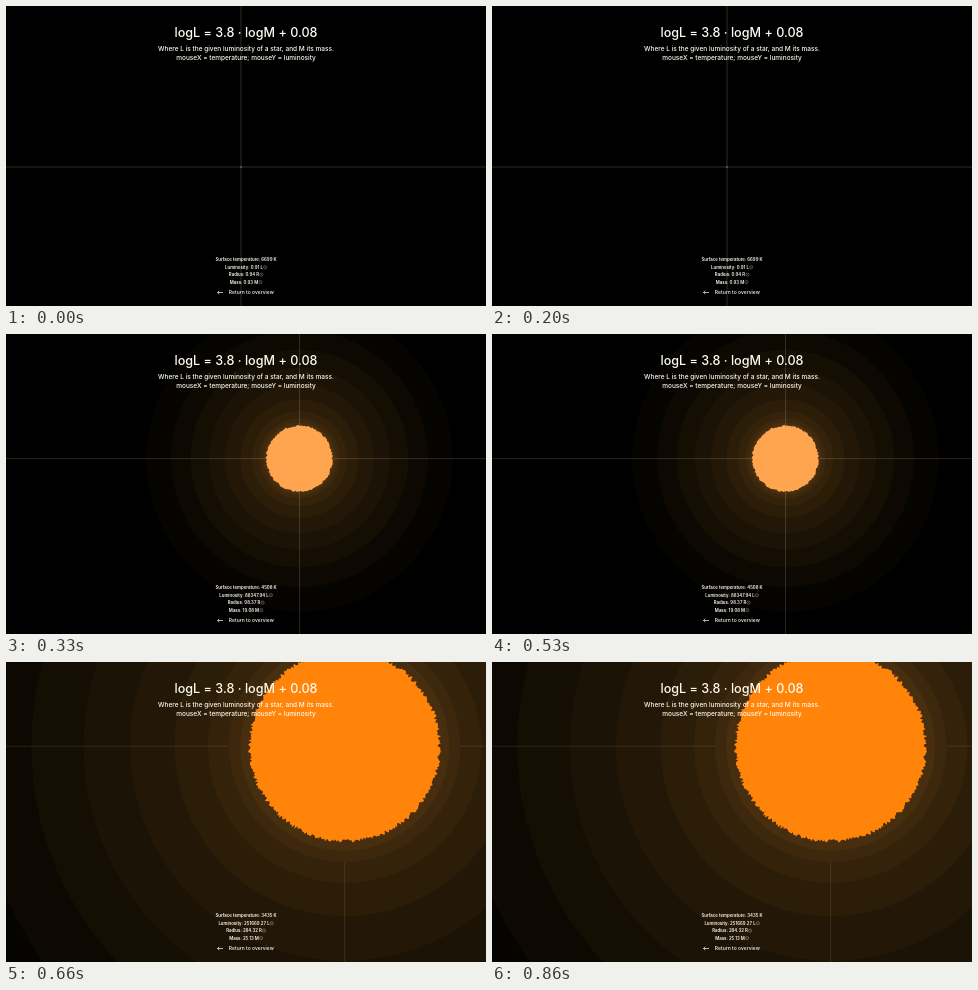
Write an HTML page with a canvas that moves like this. It is 480x300 px and loops after 0.99 s.

```html
<!DOCTYPE html>
<html lang="en">
<head>
<meta charset="utf-8">
<title>Mass and luminosity</title>
<style>
html, body { margin: 0; width: 100%; height: 100%; overflow: hidden; background: #000; }
canvas { display: block; }
</style>
</head>
<body>
<canvas id="stage" width="480" height="300"></canvas>
<script>
const ctx = document.getElementById('stage').getContext('2d');
const STEP = 330;
const SANS = 'Inter, Lato, sans-serif';
const RINGS = [4.65, 3.9, 3.3, 2.75, 2.26, 1.79, 1.44, 1.22, 1.1];

const states = [
  { x: 235, y: 161, r: 0.7, color: '#8d8b88', glow: 0, spikes: 0, line: 0.19, gap: 0,
    temp: '6699', lum: '0.91', radius: '0.94', mass: '0.93' },
  { x: 293.5, y: 124.6, r: 33, color: '#ffa54f', glow: 0.023, spikes: 0.9, line: 0.15, gap: 0,
    temp: '4508', lum: '88347.94', radius: '98.37', mass: '19.08' },
  { x: 338.7, y: 84.2, r: 95, color: '#ff8409', glow: 0.023, spikes: 2, line: 0.1, gap: 116,
    temp: '3435', lum: '251669.27', radius: '284.32', mass: '25.13' }
];

function random(seed) {
  return () => {
    seed = (seed * 16807) % 2147483647;
    return seed / 2147483647;
  };
}

function disc(x, y, r) {
  ctx.beginPath();
  ctx.arc(x, y, r, 0, Math.PI * 2);
  ctx.fill();
}

// Stacked translucent discs, a little stronger towards the star
function drawGlow(s) {
  if (!s.glow) return;
  RINGS.forEach((k, i) => {
    ctx.fillStyle = `rgba(255, 160, 60, ${s.glow * (1 + 0.13 * i)})`;
    disc(s.x, s.y, s.r * k);
  });
}

function drawCross(s) {
  const x = s.x, y = s.y, g = s.gap;
  ctx.fillStyle = `rgba(255, 240, 220, ${s.line})`;
  ctx.fillRect(0, y - 0.5, x - g, 1);
  ctx.fillRect(x + g, y - 0.5, 480 - x - g, 1);
  ctx.fillRect(x - 0.5, 0, 1, Math.max(0, y - g));
  ctx.fillRect(x - 0.5, y + g, 1, 300 - y - g);
}

function drawStar(s) {
  ctx.fillStyle = s.color;
  if (!s.spikes) return disc(s.x, s.y, s.r);
  const rnd = random(4711);
  const n = Math.round(s.r * 4.4);
  ctx.beginPath();
  for (let i = 0; i < n; i++) {
    const a = i / n * Math.PI * 2;
    const r = s.r + s.spikes * (rnd() * 2 - 1);
    ctx.lineTo(s.x + r * Math.cos(a), s.y + r * Math.sin(a));
  }
  ctx.closePath();
  ctx.fill();
}

function text(str, y, size, weight = 500, x = 240) {
  ctx.font = `${weight} ${size}px ${SANS}`;
  ctx.fillText(str, x, y);
}

// A reading in solar units: label, value, unit letter and a dim sun sign
function solar(label, value, unit, y) {
  const str = `${label}: ${value} ${unit}`;
  ctx.font = `600 4.35px ${SANS}`;
  const w = ctx.measureText(str).width, sign = 4;
  const sunX = 240 + w / 2 + 0.2, sunY = y - 1.7;
  ctx.fillText(str, 240 - sign / 2, y);
  ctx.save();
  ctx.globalAlpha = 0.6;
  ctx.lineWidth = 0.5;
  ctx.beginPath();
  ctx.arc(sunX, sunY, 1.6, 0, Math.PI * 2);
  ctx.stroke();
  disc(sunX, sunY, 0.4);
  ctx.restore();
}

function drawArrow() {
  ctx.lineWidth = 0.7;
  ctx.beginPath();
  ctx.moveTo(217, 286.5);
  ctx.lineTo(211.5, 286.5);
  ctx.moveTo(213.3, 284.8);
  ctx.lineTo(211.5, 286.5);
  ctx.lineTo(213.3, 288.2);
  ctx.stroke();
}

function drawText(s) {
  ctx.fillStyle = ctx.strokeStyle = '#fffaf0';
  ctx.textAlign = 'center';
  text('logL = 3.8 · logM + 0.08', 30.6, 12.6);
  text('Where L is the given luminosity of a star, and M its mass.', 45.4, 6.5);
  text('mouseX = temperature; mouseY = luminosity', 54.4, 6.5);
  text(`Surface temperature: ${s.temp} K`, 255.2, 4.35, 600);
  solar('Luminosity', s.lum, 'L', 262.9);
  solar('Radius', s.radius, 'R', 270.3);
  solar('Mass', s.mass, 'M', 277.8);
  text('Return to overview', 288.2, 5, 500, 245.3);
  drawArrow();
}

function draw(time) {
  const s = states[Math.floor(time / STEP) % states.length];
  ctx.fillStyle = '#000';
  ctx.fillRect(0, 0, 480, 300);
  drawGlow(s);
  drawCross(s);
  drawStar(s);
  drawText(s);
}

let start = null;
function tick(now) {
  if (start === null) start = now;
  draw(Math.max(0, now - start));
  requestAnimationFrame(tick);
}
draw(0);
requestAnimationFrame(tick);
</script>
</body>
</html>
```
